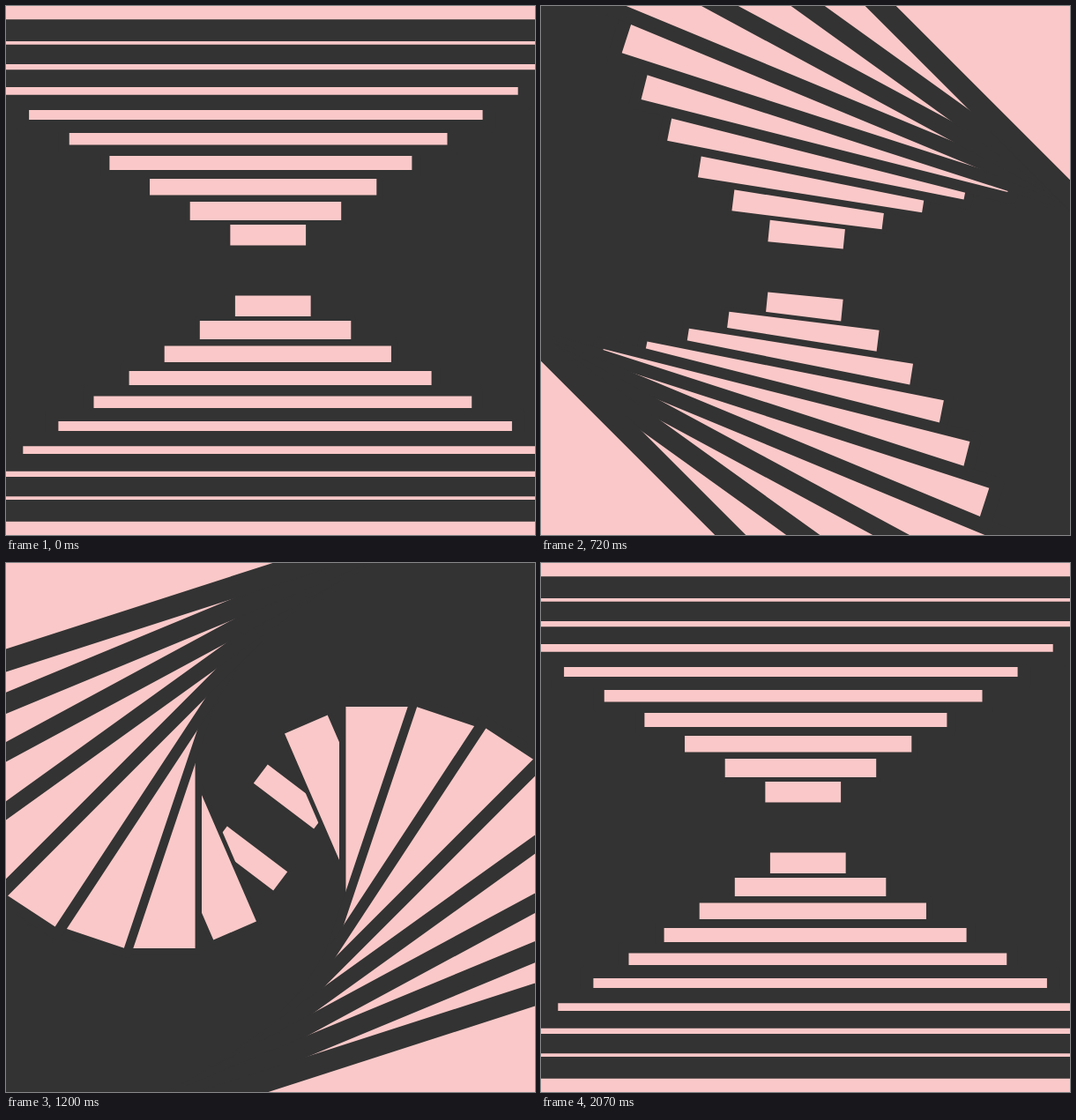
These frames come from a looping animation (600 px wide and 600 px high, 2100 ms). An HTML page:

```html
<!DOCTYPE html>
<html lang="en">
<head>
<meta charset="utf-8">
<title>Turning bars</title>
<style>
  html, body { margin: 0; width: 100%; height: 100%; overflow: hidden; background: #333; }
  svg { display: block; width: 100vw; height: 100vh; }
  rect { fill: #fac8c8; stroke: #333; stroke-width: 2.48; stroke-linejoin: round; }
</style>
</head>
<body>
<svg viewBox="-300 -300 600 600" id="stage"></svg>
<script>
  const NS = "http://www.w3.org/2000/svg";
  const RINGS = 10, LOOP = 2100, TURN = 1800, STAGGER = 30, STEP = 30;
  const stage = document.getElementById("stage");

  function add(parent, tag, attrs) {
    const el = document.createElementNS(NS, tag);
    for (const key in attrs) el.setAttribute(key, attrs[key]);
    return parent.appendChild(el);
  }

  // Each ring is the same pair of bars, enlarged; larger rings lie on top.
  const rings = Array.from({ length: RINGS }, () => {
    const ring = add(stage, "g", {});
    for (const angle of [0, 180]) {
      add(ring, "rect", {
        x: -46.89, y: -56.24, width: 88.23, height: 29,
        transform: `rotate(${angle})`
      });
    }
    return ring;
  });

  function expoInOut(p) {
    if (p <= 0) return 0;
    if (p >= 1) return 1;
    return p < 0.5 ? 2 ** (20 * p - 11) : 1 - 2 ** (9 - 20 * p);
  }

  function draw(time) {
    rings.forEach((ring, n) => {
      const delay = (RINGS - 1 - n) * STAGGER;
      const angle = 360 * expoInOut((time - delay) / TURN);
      ring.setAttribute("transform", `rotate(${angle}) scale(${n + 1})`);
    });
  }

  const start = performance.now();

  function tick() {
    const time = (performance.now() - start + 1) % LOOP;
    draw(Math.floor(time / STEP) * STEP);
    requestAnimationFrame(tick);
  }

  draw(0);
  requestAnimationFrame(tick);
</script>
</body>
</html>
```
